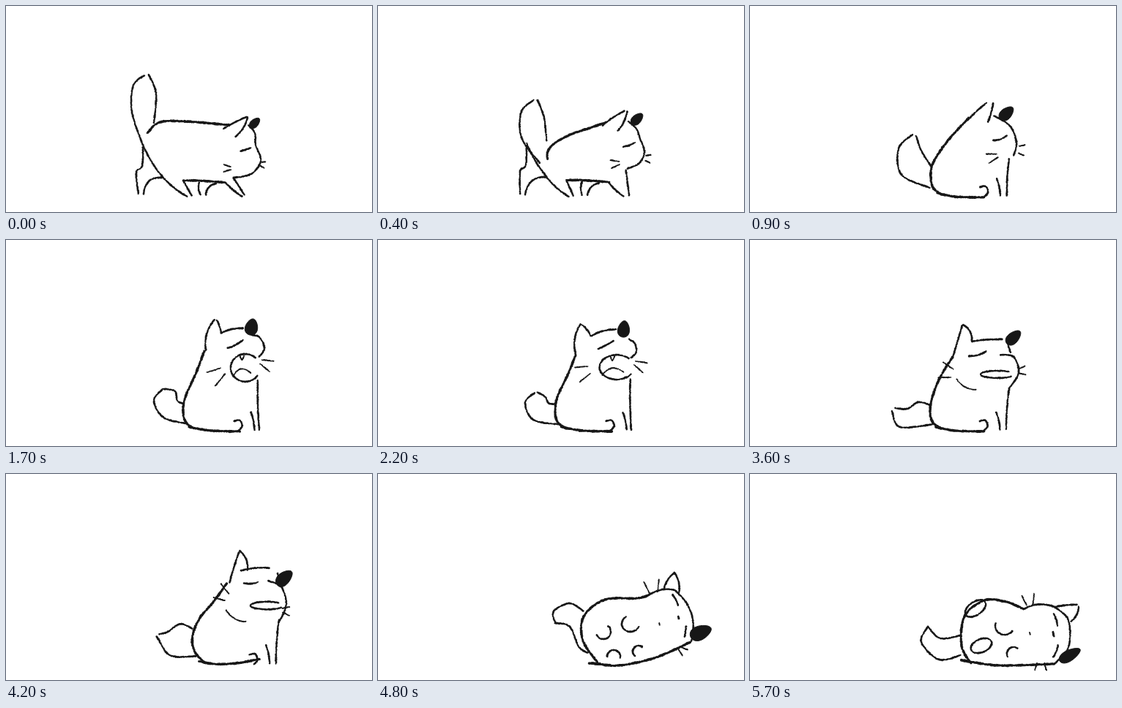
Recreate the animation shown at these times as an HTML page with a canvas. Size 500x282 px, loop 5800 ms.

```html
<!DOCTYPE html>
<html lang="en">
<head>
<meta charset="utf-8">
<title>Sleepy cat</title>
<style>
  html, body { margin: 0; width: 100%; height: 100%; overflow: hidden; background: #fff; }
  canvas { display: block; width: 500px; height: 282px; }
</style>
</head>
<body>
<canvas id="stage" width="500" height="282"></canvas>
<script>
const LOOP = 5800, STEP = 100, SAMPLES = 36, GROUND = 260;
const { PI, sin, cos, hypot, min, max } = Math;
const ctx = document.getElementById('stage').getContext('2d');

const mix = (a, b, u) => a + (b - a) * u;
const smooth = u => u * u * (3 - 2 * u);
const height = y => max(0, (GROUND - y) / 140);
const sample = f => Array.from({ length: SAMPLES }, (_, i) => f(i / (SAMPLES - 1)));

function random(seed) {
  return () => (seed = seed * 16807 % 2147483647) / 2147483647;
}

// Line from one point to another, bent towards its right-hand side.
function arc(x0, y0, x1, y1, bend = 0) {
  const dx = x1 - x0, dy = y1 - y0, len = hypot(dx, dy);
  return sample(t => {
    const b = bend * 4 * t * (1 - t) / len;
    return [x0 + dx * t - dy * b, y0 + dy * t + dx * b];
  });
}

// Part of an ellipse.
function loop(cx, cy, rx, ry, from, sweep, tilt = 0) {
  return sample(t => {
    const x = rx * cos(from + sweep * t), y = ry * sin(from + sweep * t);
    return [cx + x * cos(tilt) - y * sin(tilt), cy + x * sin(tilt) + y * cos(tilt)];
  });
}

// Smooth curve through a few x, y pairs.
function path(...n) {
  const last = n.length / 2 - 1;
  const at = (i, k) => n[2 * max(0, min(last, i)) + k];
  return sample(t => {
    const i = min(last - 1, Math.floor(t * last)), u = t * last - i;
    return [0, 1].map(k => {
      const [a, b, c, d] = [-1, 0, 1, 2].map(j => at(i + j, k));
      return b + u / 2 * (c - a + u * (2 * a - 5 * b + 4 * c - d + u * (3 * (b - c) + d - a)));
    });
  });
}

// Filled ear, broad at the base and narrow at the tip.
function leaf(x0, y0, x1, y1, w) {
  const dx = x1 - x0, dy = y1 - y0, len = hypot(dx, dy);
  return sample(t => {
    const along = (1 - cos(2 * PI * t)) / 2;
    const side = sin(2 * PI * t) * w * (1.3 - 0.5 * along) / len;
    return [x0 + dx * along - dy * side, y0 + dy * along + dx * side];
  });
}

// Two whiskers that fan out in the direction of turn.
function fan(name, x, y, len, gap, turn) {
  const hair = k => {
    const cx = x - sin(turn) * k * gap / 2, cy = y + cos(turn) * k * gap / 2;
    const dx = cos(turn + 0.3 * k) * len / 2, dy = sin(turn + 0.3 * k) * len / 2;
    return arc(cx - dx, cy - dy, cx + dx, cy + dy);
  };
  return { [name + '1']: hair(-1), [name + '2']: hair(1) };
}

function mouth(x, y, rx, ry) {
  const parts = { mouth: loop(x, y, rx, ry, -0.8, -4.9) };
  if (ry > 8) {
    parts.tongue = arc(x - 0.85 * rx, y + 0.65 * ry, x + 0.4 * rx, y + 0.4 * ry, -0.45 * ry);
    const tx = x - 0.38 * rx, ty = y - 0.9 * ry;
    parts.tooth = path(tx, ty, tx + 3, ty + 6, tx + 6, ty);
  }
  return parts;
}

// Seated body: only the neck, chest and a small sideways lean change.
function seated(lean, neckX, neckY, chestX, chestY) {
  const x = 246 + lean, paw = 312 + lean / 2, leg = 335 + lean / 2;
  return {
    back: path(x + 12, 258, x + 1, 250, x - 3, 236, x, 215,
      mix(x, neckX, 0.5) - lean, mix(215, neckY, 0.5), neckX, neckY),
    bottom: path(x + 5, 256, 280, 261, 320, 262),
    paw: path(paw, 248, paw + 8, 247, paw + 11, 255, paw + 6, 261),
    leg1: arc(chestX, chestY, 347 + lean, 260, 1),
    leg2: arc(leg, 236, leg + 5, 260, -1)
  };
}

const poses = [
  { at: 0, head: [335, 190], strokes: {
    tailL: path(189, 95, 174, 109, 172, 145, 187, 191),
    tailR: path(195, 94, 205, 120, 202, 161),
    back: path(193, 174, 210, 159, 245, 158, 306, 163),
    rump: arc(187, 190, 214, 234, 2),
    legA: path(187, 193, 186, 219, 178, 228, 181, 258),
    legB: arc(188, 258, 215, 235, -9),
    legC: arc(214, 234, 248, 261, 2),
    belly: arc(242, 239, 301, 242, -1),
    legD: arc(242, 239, 254, 260),
    legE: arc(264, 241, 266, 259, 2),
    legF: arc(287, 243, 273, 259, 4),
    legG: arc(301, 243, 323, 261, 1),
    leg1: arc(311, 236, 326, 259),
    face: path(311, 235, 335, 230, 348, 212, 341, 190, 340, 174, 331, 163),
    earA: arc(297, 168, 329, 152, -1),
    earB: arc(330, 152, 313, 179, -3),
    dark: leaf(334, 166, 346, 154, 5),
    eye: arc(320, 199, 335, 194),
    ...fan('whiskL', 302, 222, 11, 7, PI),
    ...fan('whiskR', 351, 217, 6, 7, 0.2)
  } },
  { at: 900, head: [350, 180], strokes: {
    ...seated(4, 299, 153, 354, 209),
    tailL: path(222, 176, 203, 195, 207, 231, 246, 249),
    tailR: path(227, 178, 234, 198, 247, 219),
    face: path(360, 205, 364, 187, 355, 164, 333, 150),
    earA: arc(297, 157, 324, 132, -1),
    earB: arc(332, 133, 325, 159, -1),
    dark: leaf(342, 155, 359, 139, 7),
    eye: arc(332, 184, 351, 177, 2),
    ...fan('whiskL', 331, 207, 15, 9, PI - 0.3),
    ...fan('whiskR', 371, 197, 8, 12, 0.1)
  } },
  { at: 1700, head: [325, 150], strokes: {
    ...seated(-1, 271, 152, 344, 192),
    ...mouth(327, 175, 20, 19),
    tailL: path(214, 204, 202, 220, 215, 243, 245, 251),
    tailR: path(216, 204, 231, 207, 234, 220, 242, 224),
    face: path(346, 160, 353, 148, 346, 133, 335, 130),
    crown: arc(295, 127, 324, 121, -2),
    earA: arc(273, 151, 285, 109, -5),
    earB: arc(288, 110, 294, 128, -1),
    dark: leaf(333, 130, 338, 108, 8),
    eye: arc(303, 148, 324, 137, 1),
    ...fan('whiskL', 288, 185, 21, 16, PI - 0.6),
    ...fan('whiskR', 356, 170, 17, 11, 0.4)
  } },
  { at: 2800, head: [320, 155], strokes: {
    ...seated(-1, 268, 166, 346, 188),
    ...mouth(325, 173, 28, 14),
    tailL: path(214, 216, 200, 226, 208, 250, 248, 254),
    tailR: path(220, 215, 229, 229, 242, 225),
    face: arc(346, 163, 353, 143, 6),
    crown: arc(287, 137, 328, 124, -3),
    earA: arc(267, 166, 266, 123, -5),
    earB: arc(266, 124, 287, 137, -2),
    dark: leaf(336, 137, 336, 114, 7),
    eye: arc(297, 151, 319, 139),
    ...fan('whiskL', 270, 176, 16, 17, PI),
    ...fan('whiskR', 361, 174, 17, 9, 0.5)
  } },
  { at: 3600, head: [335, 165], strokes: {
    ...seated(3, 277, 160, 354, 203),
    ...mouth(338, 184, 23, 5),
    tailL: path(194, 234, 205, 256, 252, 252),
    tailR: path(198, 230, 215, 231, 230, 222, 246, 226),
    face: path(354, 203, 367, 182, 360, 160, 342, 157),
    crown: arc(303, 139, 345, 136, -1),
    brow: arc(352, 142, 356, 154),
    earA: arc(277, 161, 290, 117),
    earB: arc(291, 116, 303, 138, -4),
    dark: leaf(351, 142, 369, 125, 7),
    eye: arc(299, 159, 323, 152, 2),
    cheek: arc(282, 190, 309, 205, 4),
    ...fan('whiskL', 268, 180, 18, 17, PI + 0.3),
    ...fan('whiskR', 372, 179, 10, 9, -0.1)
  } },
  { at: 4800, head: [410, 195], strokes: {
    tailL: path(242, 204, 262, 209, 274, 236, 287, 245),
    tailR: path(242, 204, 240, 188, 262, 177, 281, 188),
    back: path(300, 258, 280, 228, 281, 195, 310, 172, 355, 170, 375, 163),
    crown: arc(375, 163, 405, 159, -3),
    bottom: path(292, 259, 330, 262, 380, 251, 427, 230),
    shade: arc(288, 259, 304, 260),
    face: arc(428, 229, 405, 159, 12),
    earA: arc(391, 156, 404, 136, -2),
    earB: arc(405, 135, 411, 165, -3),
    dark: leaf(427, 223, 455, 211, 9),
    eye: arc(402, 165, 410, 180, -1),
    eye2: arc(421, 208, 419, 223),
    nose: arc(384, 204, 385, 207),
    dot: arc(410, 195, 411, 198),
    pawA: loop(308, 216, 10, 10, -0.9, 3.7),
    pawB: loop(345, 205, 12, 11, -2.1, -3.9),
    pawC: loop(322, 250, 9, 9, PI, 3.4),
    pawD: loop(356, 243, 8, 8, -0.9, -3.2),
    ...fan('whiskL', 375, 154, 18, 16, -1.75),
    ...fan('whiskR', 415, 241, 12, 7, 0.7)
  } },
  { at: 5700, head: [415, 215], strokes: {
    tailL: path(243, 209, 234, 230, 258, 254, 288, 248),
    tailR: path(243, 209, 260, 225, 288, 221),
    back: path(302, 259, 289, 235, 293, 195, 320, 173, 350, 175, 374, 185),
    crown: arc(374, 185, 416, 182, -5),
    bottom: path(290, 255, 340, 262, 416, 260),
    shade: arc(289, 255, 303, 258),
    face: path(416, 260, 435, 237, 435, 200, 416, 182),
    earA: arc(417, 182, 447, 179, -1),
    earB: arc(449, 181, 438, 202, -3),
    dark: leaf(423, 256, 451, 240, 7),
    eye: arc(415, 191, 420, 209, -1),
    eye2: arc(421, 234, 414, 251, -1),
    nose: arc(382, 217, 383, 220),
    dot: arc(414, 216, 415, 222),
    pawA: loop(308, 184, 16, 9, -0.9, 2 * PI, -0.6),
    pawB: loop(348, 208, 13, 12, -2.8, -2.9),
    pawC: loop(316, 235, 15, 9, PI, 2 * PI, -0.4),
    pawD: loop(360, 246, 9, 9, -0.9, -2.8),
    ...fan('whiskL', 381, 172, 15, 13, -1.75),
    ...fan('whiskR', 397, 264, 10, 13, PI / 2)
  } }
];

const names = [...new Set(poses.flatMap(p => Object.keys(p.strokes)))];
const weight = name =>
  /back|bottom|belly|shade/.test(name) ? 2.7 :
  /whisk|tongue|tooth|cheek|nose/.test(name) ? 1.5 : 2.05;

const blend = (a, b, u) => a.map((p, i) => [mix(p[0], b[i][0], u), mix(p[1], b[i][1], u)]);

// A stroke known to one pose only follows the head until it is swapped.
function follow(pts, from, head) {
  const dx = head[0] - from[0], dy = head[1] - from[1];
  return pts.map(([x, y]) => [x + dx, y + dy * min(1, height(y))]);
}

function pencil(pts, w, rnd) {
  const phase = rnd() * 6;
  let len = 0;
  ctx.beginPath();
  for (let i = 1; i < pts.length; i++) {
    const [x0, y0] = pts[i - 1], [x1, y1] = pts[i];
    const seg = hypot(x1 - x0, y1 - y0), n = max(1, Math.ceil(seg / 0.6));
    for (let k = 0; k < n; k++) {
      const d = len + seg * k / n;
      const r = w / 2 * (0.85 + 0.15 * sin(d * 0.33 + phase) + 0.5 * rnd());
      const x = mix(x0, x1, k / n) + (rnd() - 0.5) * 0.8;
      const y = mix(y0, y1, k / n) + (rnd() - 0.5) * 0.8;
      ctx.moveTo(x + r, y);
      ctx.arc(x, y, r, 0, 7);
    }
    len += seg;
  }
  ctx.fill();
}

function patch(pts) {
  ctx.beginPath();
  pts.forEach(p => ctx.lineTo(...p));
  ctx.closePath();
  ctx.fill();
  ctx.stroke();
}

function draw(time) {
  let i = poses.length - 2;
  while (poses[i].at > time) i--;
  const A = poses[i], B = poses[i + 1];
  const t = (time - A.at) / (B.at - A.at);
  const walking = i === 0, falling = i === 4;
  const u = falling ? t * t : smooth(t);
  const head = [mix(A.head[0], B.head[0], u), mix(A.head[1], B.head[1], u)];
  const swell = sin(PI * u);
  const rnd = random(time / STEP * 131 + 17);

  ctx.fillStyle = '#fff';
  ctx.fillRect(0, 0, 500, 282);
  ctx.fillStyle = ctx.strokeStyle = '#171717';
  for (const name of names) {
    const a = A.strokes[name], b = B.strokes[name];
    let pts;
    if (a && b) pts = blend(a, b, u);
    else if (a && u < 0.5) pts = follow(a, A.head, head);
    else if (b && u >= 0.5) pts = follow(b, B.head, head);
    else continue;
    const step = name.startsWith('leg') ? 6 * (1 - t) * sin(PI * time / 300) : 0;
    pts = pts.map(([x, y]) => {
      if (walking) x += 10 * swell + step * max(0, (y - 230) / 30);
      if (falling) y -= 22 * swell * height(y);
      return [x, y];
    });
    if (name === 'dark') patch(pts);
    else pencil(pts, weight(name), rnd);
  }
}

const start = performance.now();
let shown = -1;
function tick() {
  const time = Math.floor((performance.now() - start) % LOOP / STEP) * STEP;
  if (time !== shown) draw(shown = time);
  requestAnimationFrame(tick);
}
tick();
</script>
</body>
</html>
```
